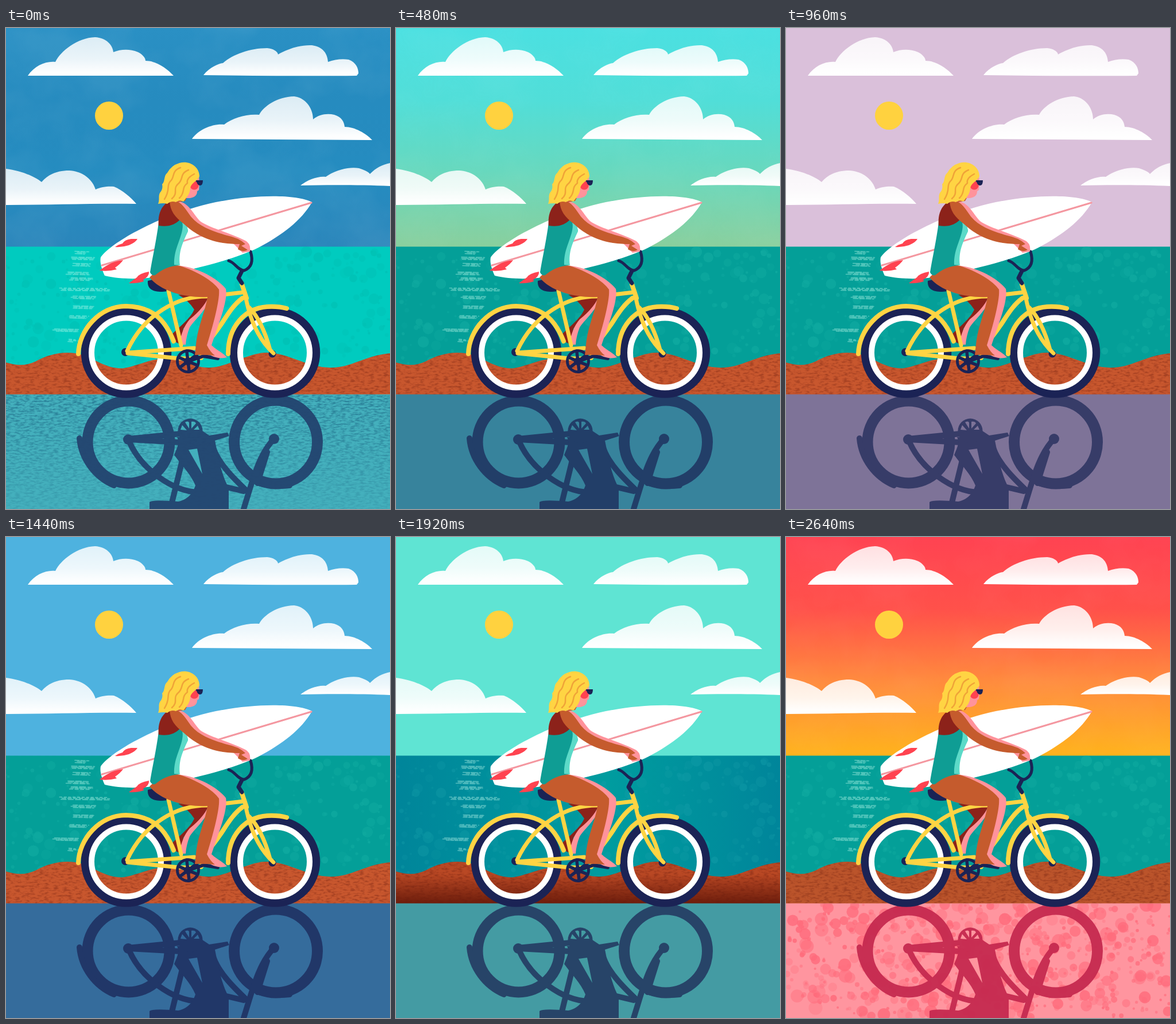
Animation, 669 px wide and 837 px high, one loop 2.88 s. Source, as an HTML page:

```html
<!DOCTYPE html>
<html lang="en">
<head>
<meta charset="utf-8">
<title>Beach ride</title>
<style>
html, body { margin: 0; width: 100%; height: 100%; overflow: hidden; }
svg { display: block; width: 100%; height: 100%; }
filter { color-interpolation-filters: sRGB; }
.line { fill: none; stroke-linecap: round; stroke-linejoin: round; }
</style>
</head>
<body>
<svg viewBox="0 0 669 837" preserveAspectRatio="none">
<defs>
  <linearGradient id="sky" x2="0" y2="1">
    <stop data-c="sky0"/><stop data-c="sky1" offset=".33"/><stop data-c="sky2" offset=".66"/><stop data-c="sky3" offset="1"/>
  </linearGradient>
  <linearGradient id="sea"><stop data-c="sea"/><stop data-c="seaMid" offset=".55"/><stop data-c="sea" offset="1"/></linearGradient>
  <linearGradient id="sand" x2="0" y2="1"><stop data-c="sand" offset=".3"/><stop data-c="sandLow" offset="1"/></linearGradient>
  <linearGradient id="cloud" x2="0" y2="1">
    <stop stop-color="#fff" stop-opacity=".83"/><stop offset=".55" stop-color="#fff" stop-opacity=".9"/><stop offset=".95" stop-color="#fff"/>
  </linearGradient>
  <filter id="grain" x="0" y="0" width="1" height="1">
    <feTurbulence type="fractalNoise" baseFrequency=".12 .3" numOctaves="3" seed="4"/>
    <feColorMatrix values="0 0 0 0 .4  0 0 0 0 .1  0 0 0 0 .05  3 0 0 0 -1.35"/>
    <feComposite in2="SourceGraphic" operator="in"/>
  </filter>
  <filter id="haze" x="0" y="0" width="1" height="1">
    <feTurbulence type="fractalNoise" baseFrequency=".009" numOctaves="4" seed="8"/>
    <feColorMatrix values="0 0 0 0 1  0 0 0 0 1  0 0 0 0 1  3 0 0 0 -1.2"/>
  </filter>
  <filter id="ripple" x="0" y="0" width="1" height="1">
    <feTurbulence type="fractalNoise" baseFrequency=".12 .35" numOctaves="3" seed="2"/>
    <feColorMatrix values="0 0 0 0 .1  0 0 0 0 .38  0 0 0 0 .5  3 0 0 0 -1.2"/>
  </filter>
  <linearGradient id="fade" x2="0" y2="1"><stop stop-color="#fff"/><stop offset="1" stop-color="#444"/></linearGradient>
  <mask id="fadeDown"><rect y="638" width="669" height="199" fill="url(#fade)"/></mask>
  <clipPath id="groundClip"><rect y="638" width="669" height="199"/></clipPath>
  <path id="dunes" d="M0 582C20 588 35 588 52 580C75 567 105 560 135 569C160 580 180 594 205 592C230 588 250 576 280 574C310 574 325 592 355 591C385 590 420 567 450 565C490 563 520 590 565 591C600 592 625 570 669 566V638H0Z"/>
</defs>

<rect width="669" height="382" fill="url(#sky)"/>
<rect id="skyHaze" width="669" height="381" filter="url(#haze)"/>
<circle cx="179.500" cy="152.500" r="24.500" fill="#ffd23f"/>
<g fill="url(#cloud)">
  <path d="M38 83C50 65 70 57 86 59C95 40 125 17 155 16C175 17 186 30 187 42C200 37 215 36 230 42C238 46 243 52 243 57C262 57 280 70 292 83Z"/>
  <path d="M344 82C355 68 370 62 378 61C395 46 425 35 455 35C465 36 473 40 474 46C490 37 512 29 533 30C553 33 560 45 561 59C572 55 585 53 597 55C610 60 614 70 614 79L611 83Q500 84 344 82Z"/>
  <path d="M324 193C335 177 360 166 380 168C395 156 420 149 441 151C449 136 472 120 502 119C522 121 535 140 535 159C545 150 560 148 572 151C585 155 589 163 590 172C608 172 628 184 638 195Z"/>
  <path d="M0 245C25 248 50 258 62 268C75 253 92 248 110 248C132 249 150 262 156 281C165 276 180 275 188 276C203 282 218 295 227 306C150 305 80 308 0 308Z"/>
  <path d="M513 274C525 264 545 257 557 259C575 246 600 241 615 244C625 247 632 251 634 254C645 243 655 238 669 235V275C620 273 560 273 513 274Z"/>
</g>

<rect y="380.500" width="669" height="215" fill="url(#sea)"/>
<g id="seaSpots" data-c="spot" opacity=".5"></g>
<g id="glints" class="line" stroke="#c9fff0" stroke-opacity=".42" stroke-width="1.700"></g>
<use href="#dunes" fill="url(#sand)"/>
<use href="#dunes" filter="url(#grain)" opacity=".35"/>

<rect y="637.500" width="669" height="200" data-c="ground"/>
<g mask="url(#fadeDown)"><rect id="groundRipple" y="638" width="669" height="199" filter="url(#ripple)"/></g>
<g id="groundSpots" fill="#ff3f56" clip-path="url(#groundClip)"></g>

<g clip-path="url(#groundClip)" opacity=".95">
  <g class="line" data-s="shadow" stroke-width="10">
    <g stroke-width="19"><circle cx="213.500" cy="720.500" r="71.500"/><circle cx="470" cy="720.500" r="72.500"/></g>
    <path d="M128 714C131 750 155 782 188 796M494 796Q465 799 440 792"/>
    <path d="M213 715L304 706M213 716L304 721M214 718C235 768 290 806 335 808M310 740L288 830"/>
    <path d="M362 733C372 760 398 785 420 806M380 798L414 806"/>
    <path d="M467 715C440 742 429 790 414 837M455 738L438 792"/>
  </g>
  <g data-c="shadow">
    <circle cx="213" cy="716" r="9"/><circle cx="467" cy="715" r="9"/>
    <path d="M298 712L320 710L342 701L354 709L386 704L389 710L364 718C370 748 376 780 388 800V837H250V825Q255 820 300 824C320 820 327 805 330 796C322 776 305 760 293 743C298 730 303 722 298 712Z"/>
    <circle cx="321" cy="701" r="21.500"/>
  </g>
  <path data-c="ground" d="M319 697L312 686Q318 683 319 687ZM323 697V685Q329 684 331 688ZM327 699L334 692L337 699ZM315 700L307 691L304 699ZM318 734L342 776L333 732Z"/>
</g>

<path fill="#fff" d="M533 303C500 286 400 291 330 312C260 332 185 372 165 399C163 408 167 420 172 431C200 438 240 437 262 433C330 420 400 402 440 382C480 361 515 335 533 303Z"/>
<path class="line" d="M167 413L532 304" stroke="#f497a0" stroke-width="3"/>
<g fill="#ff4350">
  <path d="M190 381Q195 377 203 375Q207 368 218 367L229 367Q226 373 214 378Q202 382 190 381Z"/>
  <path d="M163 422Q172 415 178 412Q187 406 204 404Q199 411 190 417L193 420Q178 424 163 422Z"/>
  <path d="M214 444L228 434Q232 427 249 424Q250 432 239 438L240 441Q226 445 214 444Z"/>
</g>

<g class="line" stroke="#1b2355" stroke-width="14.500">
  <circle cx="209.500" cy="565" r="71.500"/><circle cx="468.500" cy="565" r="71.500"/>
</g>
<g class="line" stroke="#fff" stroke-width="10">
  <circle cx="209.500" cy="565" r="60.500"/><circle cx="468.500" cy="565" r="60.500"/>
</g>
<circle cx="208" cy="564" r="7" fill="#1b2355"/><circle cx="464" cy="567" r="6.500" fill="#1b2355"/>

<path fill="#8c221a" d="M300 464L353 466C346 490 326 502 309 523L304 550Q290 546 288 534C302 520 321 506 328 490Q318 474 300 464Z"/>
<path fill="#ff939b" d="M355 468C353 488 328 508 320 521Q314 536 313 551H302Q306 523 320 507Q344 488 353 468Z"/>
<path fill="#1b2355" d="M247 440C246 454 255 459 272 459Q295 457 304 449L270 434Z"/>
<g class="line" stroke="#ffd443" stroke-width="8">
  <path d="M126 567C127 526 163 484 209 484C242 485 262 496 276 515Q286 529 292 545"/>
  <path d="M387 567C387 520 415 488 455 485Q475 484 489 488"/>
  <g stroke-width="7"><path d="M211 562C240 499 298 466 352 467L413 460M212 566L302 575H332M212 565L328 557M283 457L305 552"/></g>
  <path d="M412 470C386 489 376 522 350 547Q344 561 340 574M411 446L419 470"/>
  <g stroke-width="7"><path d="M417 465C424 505 438 540 466 566M422 485C437 498 451 526 460 560"/></g>
</g>
<g class="line" stroke="#1b2355">
  <path d="M388 405C400 409 403 421 415 422C430 416 430 402 426 389" stroke-width="5"/>
  <path d="M411 423L405 435L411 444" stroke-width="7"/>
  <circle cx="317" cy="580" r="18.500" stroke-width="5"/>
  <path id="spokes" stroke-width="5.500"/>
  <path d="M317 580L344 571L369 575" stroke-width="6"/>
</g>
<circle cx="317" cy="580" r="7" fill="#1b2355"/>

<path fill="#ff939b" d="M298 413C335 416 370 437 383 454C387 474 371 513 358 552C366 560 379 566 385 573Q372 577 357 570L340 548L358 468Z"/>
<path fill="#c55b2d" d="M250 434C265 419 285 410 303 414C332 423 361 440 371 455C373 473 360 520 350 552Q356 564 364 570Q343 568 329 569L331 550C334 520 348 490 351 468C315 470 270 459 250 434Z"/>
<path fill="#0f9d94" d="M266 338C262 370 255 400 251 425Q254 432 260 430Q277 415 301 413C299 390 308 372 317 353Q315 340 303 331Z"/>
<path fill="#5cdac8" d="M306 334Q317 342 317 354C308 373 300 390 303 413L293 412C292 387 303 372 307 352Q309 342 306 334Z"/>
<path fill="#8c221a" d="M285 301C270 309 264 325 266 344Q292 348 305 331Z"/>
<path fill="#ff939b" d="M298 301C318 303 325 322 338 336C354 348 385 354 417 370Q427 375 425 389L412 391L395 374L345 358L310 325Z"/>
<path fill="#c55b2d" d="M285 301C301 296 311 312 322 328C338 347 362 354 385 361Q406 365 417 376L410 379L421 386Q412 391 404 385L407 376Q394 376 378 374C345 369 324 354 310 341C294 329 286 318 285 301Z"/>

<path fill="#c55b2d" d="M307 280H327L316 294L312 301L299 303Z"/>
<path fill="#ff939b" d="M317 255H336L337 272L336 282L333 284Q333 297 314 296Z"/>
<circle cx="328" cy="274" r="7.500" fill="#ff4350"/>
<path fill="#1b2355" d="M329 265H343Q343 274 338 274Q334 274 332 268Z"/>
<path fill="#ffd443" d="M302 235C320 230 337 242 337 258C334 266 324 268 321 278C321 289 314 295 309 302Q302 298 296 303Q288 300 281 306Q274 304 265 306C268 299 265 293 268 287Q274 280 272 272C278 266 274 258 281 252Q288 239 302 235Z"/>
<g class="line" stroke="#f0a338" stroke-width="2.500">
  <path d="M304 243C287 249 295 260 286 267C279 275 287 281 276 298M318 247C301 254 311 263 299 272C290 281 301 286 289 297M328 254Q314 261 316 270C305 278 313 286 302 296"/>
</g>
</svg>
<script>
const STEP = 240, STEPS = 12;
const $ = id => document.getElementById(id);

const keys = ['sky0', 'sky1', 'sky2', 'sky3', 'sea', 'seaMid', 'spot', 'sand', 'sandLow', 'ground', 'shadow'];
const scene = (step, colours, haze, ripple, spots) => ({
  step, haze, ripple, spots,
  colours: colours.split(' ').map(c => c.match(/../g).map(h => parseInt(h, 16)))
});
const teal = '049f98 049f98 1cb5a9', clay = 'c8572e c8572e';
const scenes = [
  scene(0, `2a90c4 268bbf 258cc0 2b86bb 00cbbf 00cbbf 00b8ac ${clay} 44b0bd 23446f`, .05, .6, 0),
  scene(2, `4be0e1 51ded8 68d8bd 8acf9d ${teal} ${clay} 37839c 213a66`, .03, 0, 0),
  scene(4, `dac0da dac0da dac0da dac0da ${teal} ${clay} 7e7398 343966`, 0, 0, 0),
  scene(6, `4eb2df 4eb2df 4eb2df 4eb2df ${teal} ${clay} 356c9c 213566`, 0, 0, 0),
  scene(8, `5fe4d3 5fe4d3 5fe4d3 5fe4d3 00859a 009c9f 159faa b94824 6d1d0c 449ba3 264066`, 0, 0, 0),
  scene(9, `ff343c fd5866 f9a5b9 fedcf2 ${teal} bb542b bb542b ff94a0 c62e52`, .08, 0, 0),
  scene(11, `ff4352 ff514a ff8b3d ffb31c ${teal} bb542b bb542b ff959f c62a50`, .03, 0, .48)
];

const mix = (a, b, t) => a + (b - a) * t;

function sceneAt(step) {
  const i = scenes.findLastIndex(s => s.step <= step);
  const a = scenes[i], b = scenes[(i + 1) % scenes.length];
  const t = (step - a.step) / ((b.step - a.step + STEPS) % STEPS);
  const out = { colours: a.colours.map((c, k) => `rgb(${c.map((v, j) => Math.round(mix(v, b.colours[k][j], t)))})`) };
  for (const k of ['haze', 'ripple', 'spots']) out[k] = mix(a[k], b[k], t);
  return out;
}

function seeded(seed) {
  return () => (seed = (seed * 16807) % 2147483647) / 2147483647;
}

function scatter(id, seed, count, top, height, maxR) {
  const rnd = seeded(seed);
  let html = '';
  for (let i = 0; i < count; i++) {
    const x = rnd() * 669, y = top + rnd() * height, r = 2 + rnd() ** 2 * maxR;
    html += `<circle cx="${x.toFixed(1)}" cy="${y.toFixed(1)}" r="${r.toFixed(1)}" opacity="${(.25 + rnd() * .6).toFixed(2)}"/>`;
  }
  $(id).innerHTML = html;
}
scatter('seaSpots', 77, 330, 389, 196, 8);
scatter('groundSpots', 1234, 620, 638, 199, 10);

// Each glint is [y, left, right], drawn as a few broken strokes.
const glints = [[391, 120, 145], [401, 108, 155], [412, 115, 150], [427, 103, 147], [437, 110, 155], [455, 93, 183],
  [469, 112, 160], [486, 110, 157], [503, 105, 145], [526, 80, 130], [544, 103, 125]];
const rough = seeded(31);
$('glints').innerHTML = glints.map(([y, l, r]) => [-2.5, -.5, 1.5].map(dy => {
  const from = l + rough() * 8, to = r - rough() * 8;
  const dash = `${(4 + rough() * 9).toFixed(1)} ${(2 + rough() * 2).toFixed(1)}`;
  return `<path d="M${from.toFixed(1)} ${y + dy}L${to.toFixed(1)} ${y + dy + 1}" stroke-dasharray="${dash}"/>`;
}).join('')).join('');

$('spokes').setAttribute('d', Array.from({ length: 6 }, (_, i) => {
  const a = i * Math.PI / 3 + .4;
  return `M317 580l${(18 * Math.cos(a)).toFixed(1)} ${(18 * Math.sin(a)).toFixed(1)}`;
}).join(''));

let shown = -1;
function draw(ms) {
  const step = Math.floor(ms / STEP) % STEPS;
  if (step === shown) return;
  shown = step;
  const s = sceneAt(step);
  const colour = key => s.colours[keys.indexOf(key)];
  document.querySelectorAll('[data-c]').forEach(el =>
    el.setAttribute(el.tagName === 'stop' ? 'stop-color' : 'fill', colour(el.dataset.c)));
  document.querySelectorAll('[data-s]').forEach(el => el.setAttribute('stroke', colour(el.dataset.s)));
  $('skyHaze').setAttribute('opacity', s.haze);
  $('groundRipple').setAttribute('opacity', s.ripple);
  $('groundSpots').setAttribute('opacity', s.spots);
}

const start = performance.now();
function tick() {
  draw(performance.now() - start);
  requestAnimationFrame(tick);
}
tick();
</script>
</body>
</html>
```
